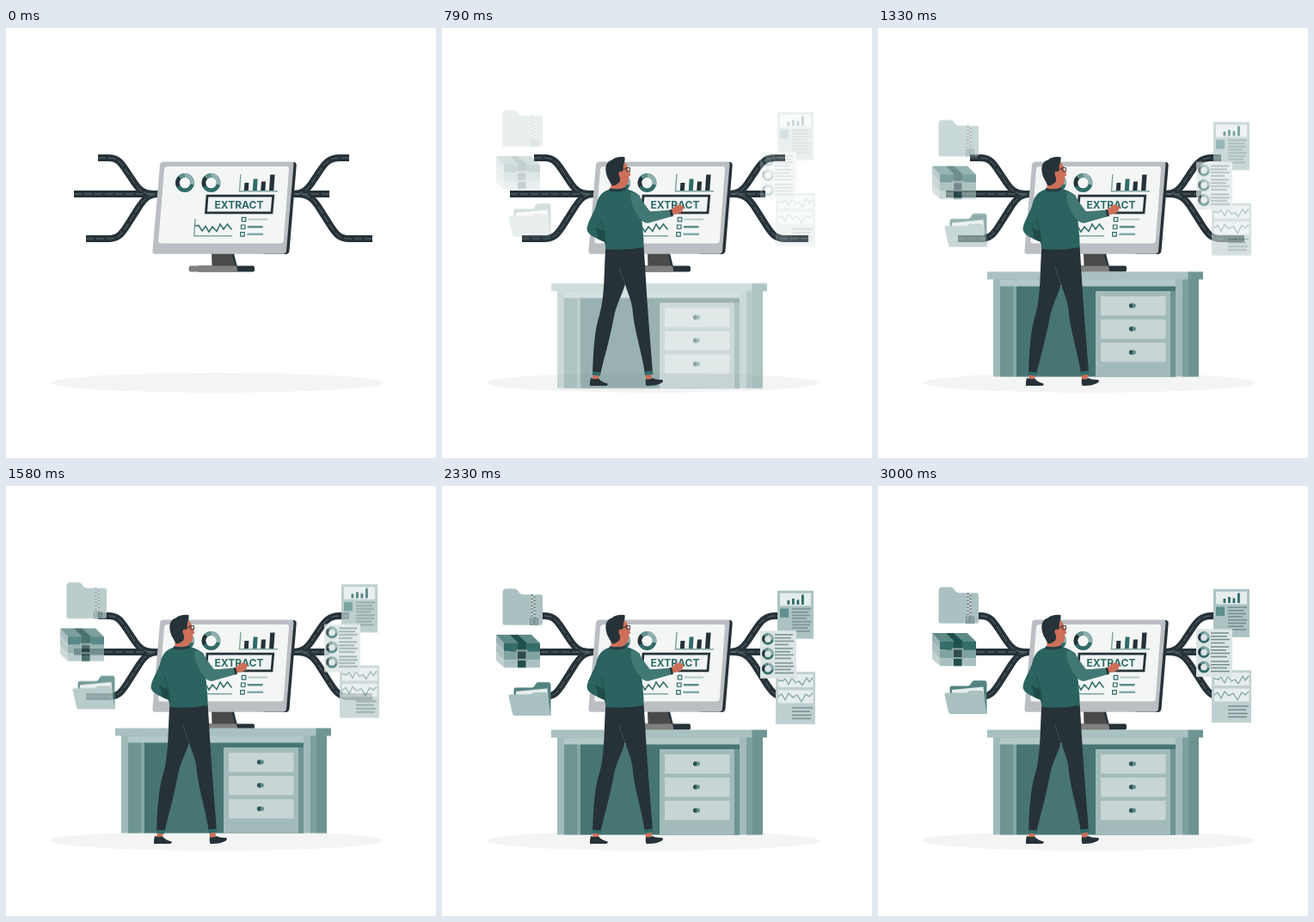
An HTML page that plays this animation: 500x500 px, repeating every 3.04 s.

```html
<!DOCTYPE html>
<html lang="en">
<head>
<meta charset="utf-8">
<title>Extract</title>
<style>
  html, body { margin: 0; height: 100%; overflow: hidden; background: #fff; }
  svg { display: block; width: 100vw; height: 100vh; }

  .man, .desk, .files { animation: 3.04s infinite; }
  .man { animation-name: show; }
  .desk { animation-name: rise; }
  .files { animation-name: drop; }

  /* entrances of about 0.9 s, 1.94 s and 2.94 s inside a 3.04 s loop */
  @keyframes show {
    0% { opacity: 0; animation-timing-function: cubic-bezier(.36, -.01, .5, 1.38); }
    29.6%, 100% { opacity: 1; }
  }
  @keyframes rise {
    0% { opacity: 0; transform: translateY(30px); animation-timing-function: cubic-bezier(.36, -.01, .5, 1.38); }
    63.8%, 100% { opacity: 1; transform: none; }
  }
  @keyframes drop {
    0% { opacity: 0; transform: translateY(-30px); animation-timing-function: cubic-bezier(.36, -.01, .5, 1.38); }
    96.7%, 100% { opacity: 1; transform: none; }
  }

  .line { fill: none; }
  .dark { fill: #263238; }
  .teal { fill: #2f6b68; }
  .skin { fill: #cd6f59; }
  .pale { fill: #e6eded; }
  .drawer { fill: #c8d5d5; }
  .text { fill: none; stroke: #748d8d; stroke-width: 1.5; }
  .wave { fill: none; stroke: #83a4a2; stroke-width: 1.3; stroke-linejoin: round; }
  text { font: 700 12px Inter, "Open Sans", sans-serif; fill: #2f6b68; }
</style>
</head>
<body>
<svg viewBox="0 0 500 500">
  <defs>
    <g id="pipes">
      <path d="M107 151H119C130 151 134 157 140 166L150 181C155 188 160 193 170 193"/>
      <path d="M93 245H119C130 245 134 240 140 231L154 209C161 198 166 193 178 193"/>
      <path d="M79 193H180"/>
      <path d="M399 151H388C376 151 371 157 365 166L355 181C350 188 345 193 335 193"/>
      <path d="M426 245H399C388 245 384 240 378 231L364 209C357 198 351 193 338 193"/>
      <path d="M376 193H332"/>
    </g>
    <g id="donut" class="line" stroke-width="4.6">
      <circle r="8.6" stroke="#2f6b68"/>
      <path d="M0-8.6A8.6 8.6 0 0 1 8.4 2" stroke="#8fb0ae"/>
      <path d="M-7.5 4.2A8.6 8.6 0 0 1-6-6.2" stroke="#263238"/>
      <path d="M-6-6.2A8.6 8.6 0 0 1 0-8.6" stroke="#5f8f8c"/>
    </g>
    <g id="knob">
      <rect x="292" width="8" height="5" rx="2.4" fill="#5c8b88"/>
      <path d="M296 0V5H294.4A2.5 2.5 0 0 1 294.4 0Z" fill="#2d5553"/>
    </g>
  </defs>

  <ellipse cx="245.5" cy="412.5" rx="193.5" ry="11.5" fill="#f4f4f4"/>

  <use href="#pipes" fill="none" stroke="#263238" stroke-width="8"/>
  <use href="#pipes" fill="none" stroke="#66757c" stroke-width=".9" stroke-dasharray="9 3"/>

  <g class="monitor">
    <path d="M239 262H264L268.5 278H239.5Z" fill="#4a4a4a"/>
    <path d="M262 262H265L269 278H267Z" class="dark"/>
    <rect x="222" y="276.5" width="67" height="7" rx="2" class="dark"/>
    <path d="M214.5 276.5H267Q269 276.5 269 283.5H214.5Q212.5 283.5 212.5 280T214.5 276.5Z" fill="#808080"/>
    <path d="M190 156H335Q338 156.5 337.7 160L329.5 259Q329 263 325 263H300Z" class="dark"/>
    <path d="M183.5 155.5H331.5Q334.8 155.5 334.5 159L326 259Q325.5 262.8 322 262.8H173.5Q170 262.8 170.4 259L179 159Q179.5 155.5 183.5 155.5Z" fill="#bbbec2"/>
    <path d="M188 161H326.5Q329.3 161 329 164L322.8 247Q322.3 250.5 319 250.5H180Q177 250.5 177.3 247L184 164.5Q184.5 161 188 161Z" fill="#f3f6f5"/>

    <use href="#donut" x="208" y="180"/>
    <use href="#donut" x="238.5" y="180"/>

    <path d="M273 170L271.5 189.7H316" class="line" stroke="#7fa5a2" stroke-width="1.5"/>
    <path d="M277.4 180H282.4L281.8 189H276.8ZM297 178.5H302L301.4 189H296.2ZM307.2 170.5H312.6L311.3 189H306Z" class="dark"/>
    <path d="M287.7 175.5H292.6L291.8 189H286.8Z" class="teal"/>

    <path d="M234 195.2H310.7L309 214.8H232.5Z" fill="#eff3f3" stroke="#263238" stroke-width="2.8"/>
    <text x="242.5" y="209.5">EXTRACT</text>

    <path d="M220 222L218.7 241.7H263" class="line" stroke="#7fa5a2" stroke-width="1.5"/>
    <path d="M219.5 230L224 229.5L228 236L232 230.5L236 237L240 231L245 236.5L249 228L253 234L257.5 228L262.5 234.5" class="line" stroke="#2f6b68" stroke-width="1.5"/>

    <path d="M274.3 220.3h4.5v4.5h-4.5zM273.5 229h4.5v4.5h-4.5zM272.7 237.7h4.5v4.5h-4.5z" class="line" stroke="#2f6b68" stroke-width="1.2"/>
    <g class="line" stroke-width="2.6" stroke-linecap="round">
      <path d="M282.5 222.5H303" stroke="#bfd0cf"/>
      <path d="M282 231.2H297.5" stroke="#5c8e8b"/>
      <path d="M281.5 239.8H298" stroke="#84aaa7"/>
    </g>
  </g>

  <g class="desk">
    <rect x="134" y="292" width="239" height="113.5" fill="#a2bbba"/>
    <rect x="142" y="292" width="15" height="113.5" fill="#6d9491"/>
    <rect x="157" y="292" width="4" height="113.5" fill="#85a8a5"/>
    <rect x="161" y="300" width="185" height="105.5" fill="#477573"/>
    <rect x="142" y="292.5" width="204" height="8" fill="#b2c9c8"/>
    <rect x="253" y="306" width="87" height="99.5" fill="#a2bbba"/>
    <rect x="340" y="306" width="6" height="99.5" fill="#6d9491"/>
    <rect x="354" y="292" width="7" height="113.5" fill="#7d9f9d"/>
    <rect x="361" y="292" width="12" height="113.5" fill="#6d9491"/>
    <rect x="127" y="283.5" width="234" height="9" fill="#a9c1c0"/>
    <rect x="360.5" y="283.5" width="17.5" height="9" fill="#6f9693"/>
    <path d="M259 312h75.5v22.5h-75.5zM259 339h75.5v22.5h-75.5zM259 366h75.5v22.5h-75.5z" class="drawer"/>
    <use href="#knob" y="320.5"/>
    <use href="#knob" y="347.5"/>
    <use href="#knob" y="374.8"/>
  </g>

  <g class="files">
    <!-- zipped folder -->
    <path d="M70.5 122Q70.5 117.5 75 117.5H83C90 117.5 88 124.2 95 124.2H114.5Q117 124.2 117 126.7V157.3Q117 159.8 114.5 159.8H73Q70.5 159.8 70.5 157.3Z" fill="#abc1c1"/>
    <rect x="103" y="124.2" width="6" height="28" fill="#cbd7d7"/>
    <path d="M104.5 124.2V152M107.6 126.2V152" class="line" stroke="#74888a" stroke-width="2.6" stroke-dasharray="2 2"/>
    <rect x="102.5" y="152" width="9" height="7.5" fill="#91a9a9" stroke="#6f8486" stroke-width=".8"/>
    <path d="M105 154.5H109M105 157H109" class="text"/>

    <!-- box -->
    <path d="M63 171L72 181V209.3L63 201Z" fill="#c3d0d0"/>
    <path d="M63 171L72 181V190L63 180Z" fill="#9cb2b2"/>
    <path d="M63 181.5L72 191.5V200L63 190.5Z" fill="#aebfbf"/>
    <path d="M63 171H104L114 181H72Z" fill="#5d8a87"/>
    <path d="M79 171H88L99 181H89Z" fill="#214f4d"/>
    <rect x="72" y="181" width="42" height="9.5" fill="#346d6a"/>
    <rect x="72" y="190.5" width="42" height="10" fill="#7fa3a1"/>
    <rect x="72" y="200.5" width="42" height="8.8" fill="#a9c0bf"/>
    <rect x="88" y="181" width="9.5" height="28.3" fill="#214f4d"/>
    <rect x="87" y="189.5" width="11.5" height="10.5" fill="#2c4c4c" stroke="#8ea5a4" stroke-width="2"/>

    <!-- open folder -->
    <path d="M83.5 235Q83.5 232.5 86 232.5H104C109 232.5 108 226.3 112 226.3H123.5Q126.5 226.3 126.5 229.3V264.8H83.5Z" fill="#528380"/>
    <path d="M86 237L122.500 233.5L125 262H86Z" class="pale"/>
    <path d="M79 240.5Q77 240.5 77.4 242.5L82 263Q82.5 264.8 84.5 264.8H126.3L122.5 240Q122 238 120 238H109Q106 238 105 239.3T101 240.5Z" fill="#a9c1c0"/>

    <!-- report -->
    <rect x="390" y="119.8" width="42" height="56" fill="#adc3c3"/>
    <rect x="393" y="122.8" width="36" height="14.5" class="pale"/>
    <path d="M401.5 131h2.8v5h-2.8zM407 129h2.8v7h-2.8zM412.5 130.5h2.8v5.5h-2.8zM418 124.5h2.8v11.5h-2.8z" class="teal"/>
    <rect x="393" y="140.5" width="10" height="10.5" fill="#5e908d"/>
    <path d="M407 141H429M407 144.7H426M407 148.4H428M407 152.1H424M407 155.8H429M407 159.5H428M407 163.2H425M407 166.9H428" class="text"/>

    <!-- charts -->
    <rect x="388" y="214.2" width="46" height="61" fill="#c0d0d0"/>
    <path d="M391 217h40.5v15h-40.5zM391 235.5h40.5v15h-40.5z" class="pale"/>
    <path d="M391 224L396 225L399 222L403 229L407 221L411 227L415 225L419 230L424 221L427 226L431 221M391 243L395 240L399 247L403 239L408 244L413 241L418 249L423 240L427 243L431 239" class="wave"/>
    <path d="M407 256H431M407 260.2H428M407 264.4H430M407 268.5H429" class="text"/>

    <!-- list -->
    <rect x="370" y="166.3" width="42" height="55.5" fill="#dce5e5"/>
    <use href="#donut" transform="translate(379 176) scale(.62)"/>
    <use href="#donut" transform="translate(379 193.3) scale(.62)"/>
    <use href="#donut" transform="translate(379 210.6) scale(.62)"/>
    <path d="M387 171H408M387 174.8H406M387 178.6H409M387 182.4H403M387 187H408M387 190.8H405M387 194.6H409M387 198.4H406M387 204H408M387 207.8H409M387 211.6H406M387 215.4H409" class="text"/>
  </g>

  <g class="man">
    <!-- shoes and ankles -->
    <path d="M176 402H183L182 409H175ZM236.500 402H244L243.500 410H237Z" class="skin"/>
    <path d="M173 407Q178 409 182 407.5Q186 412 192.5 413.5Q193.5 415.5 190 416H172Q171.5 411 173 407ZM237 408Q241 409.5 244.5 407Q249 409.5 256 409Q258 411 255.5 412.5Q249 416.5 237.5 416Q236 412 237 408Z" class="dark"/>
    <!-- trousers -->
    <path d="M190.500 253H234.500C236.500 280 237.500 305 239.500 330C241 352 243.500 378 245 402H236C232 375 223 350 221.500 327C220 315 215 306 213 298C209 311 202 323 199.500 338C195 362 189 382 184 403L175 402C176 378 177 352 183 334C190 310 188 280 190.500 253Z" class="dark"/>
    <path d="M206 277Q208 288 213 298" class="line" stroke="#45525a" stroke-width=".8"/>
    <path d="M175 399.500L184.500 400.500L184 404.500L174.800 403.500ZM235.500 399.500L245 398.500L245.500 402.500L236 404Z" class="teal"/>
    <!-- head -->
    <path d="M197 176L213 176L213 187Q208 194 196 190Z" class="skin"/>
    <path d="M205 158L213 156.500Q216.500 161 217 165.500L219.300 170.500Q219.300 172.300 217.200 172.500Q217.500 180 214.500 182.500Q210 185 205 181Z" class="skin"/>
    <path d="M197.500 183L192.500 174C188.500 164 190 155.500 197.500 153.500Q202.500 149 212.500 150Q213 155.500 211 158.500L210.500 165Q209 168.500 207.500 166.500Q204.500 167 206 172Q208 175 206.500 179Q202 184 197.500 183Z" class="dark"/>
    <path d="M206.500 167Q210 167 209 172Q207 174 206 171Z" class="skin"/>
    <path d="M208.500 165.500L214 163.500M214 162.500H218.500V167Q215 168 214 165Z" class="line" stroke="#263238" stroke-width=".9"/>
    <!-- hand -->
    <path d="M265 212Q270 209 272 206.5Q276 204.5 279 207Q284 208.5 280 210.5Q280 214 276 215.5Q271 216.5 267 217.5Z" class="skin"/>
    <!-- sweater -->
    <path d="M195 187.5C184 191 181 198 179 207C175 218 169 226 168.5 234C169 241 181 245 189 249L191 257Q213 259 234.5 255C235 244 233 234 232.5 224L230 195Q222 188.5 213 187Z" fill="#2a635f"/>
    <path d="M185 222L179.5 232Q184 235 189 236L190 249Q185 247 180.5 244.5Q182 238 178.5 233Z" fill="#214b4a"/>
    <path d="M219.500 191Q229 191.500 233.500 202L242 213.500L266.500 211.500L267.500 219L241 226.500Q235.500 228 230 221.500Q218 206 219.500 191Z" fill="#427874"/>
    <path d="M185 222Q188 237 190.5 252" class="line" stroke="#214b4a"/>
    <path d="M195 186Q204 189 213.5 185L214 188.5Q205 192 194.5 189.5Z" fill="#263f44"/>
    <path d="M264.5 211.5L267 211L269 218.5L266.5 219.5Z" class="dark"/>
  </g>
</svg>
</body>
</html>
```
